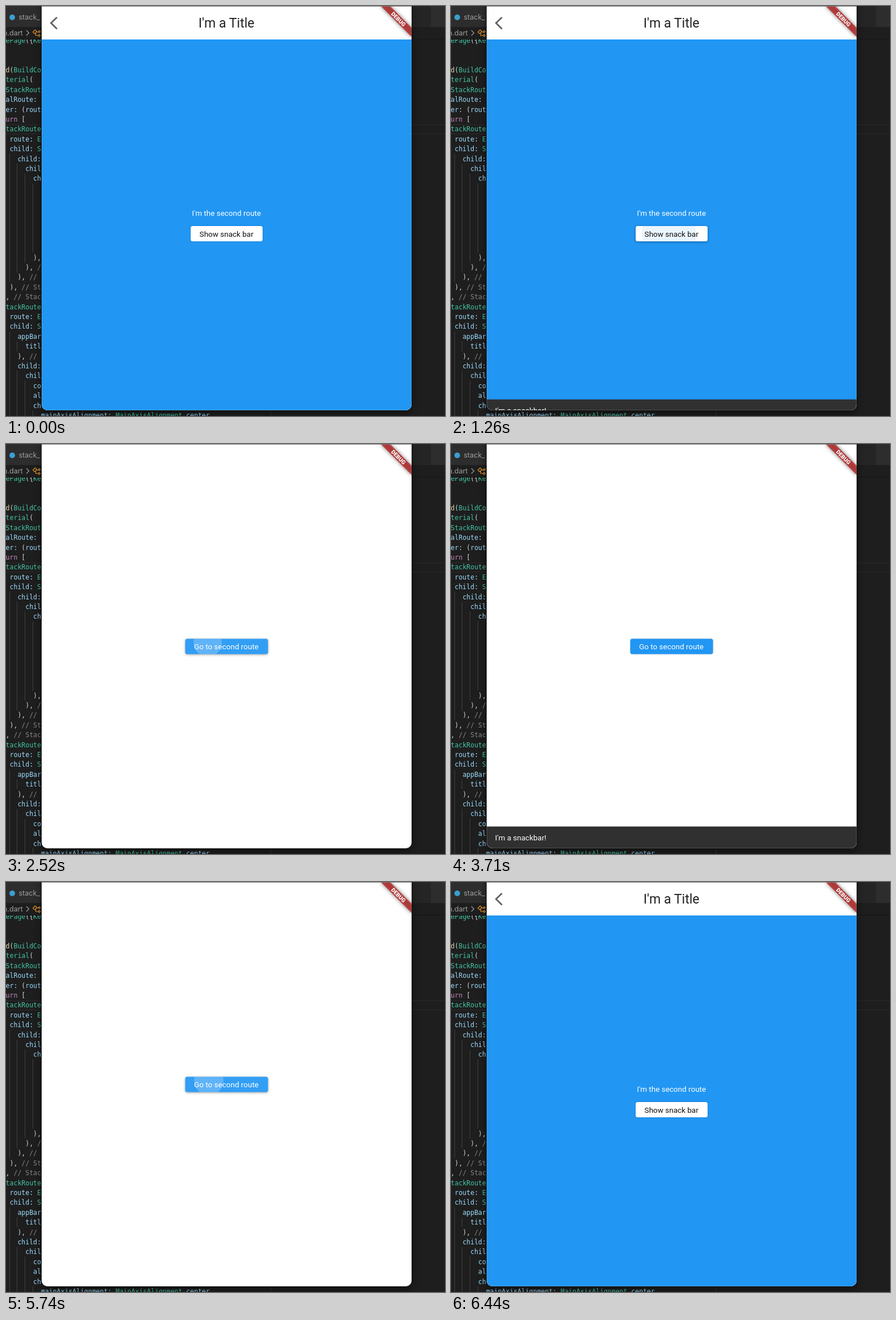
An HTML page that plays this animation: 775x723 px, repeating every 6.93 s.

```html
<!DOCTYPE html>
<html lang="en">
<head>
<meta charset="utf-8">
<title>Stacked routes with a snack bar</title>
<style>
  html, body { margin: 0; width: 100%; height: 100%; overflow: hidden; background: #1e1e1e; }
  svg { display: block; width: 775px; height: 723px; }
  text { font-family: Roboto, sans-serif; font-size: 13.5px; }
  .mid { text-anchor: middle; }
  #code text { font-family: "DejaVu Sans Mono", monospace; font-size: 11.5px; white-space: pre; }
  .ui text { font-family: Inter, sans-serif; font-size: 12.5px; fill: #a0a0a0; }
</style>
</head>
<body>
<svg viewBox="0 0 775 723" xmlns="http://www.w3.org/2000/svg">
  <defs>
    <clipPath id="winClip"><path d="M63 0H716V703a10 10 0 0 1 -10 10H73a10 10 0 0 1 -10 -10Z"/></clipPath>
    <clipPath id="goClip"><rect x="316.5" y="343.5" width="146" height="27" rx="3.5"/></clipPath>
    <clipPath id="showClip"><rect x="326" y="388" width="127" height="27" rx="3.5"/></clipPath>
    <filter id="winBlur" x="-10%" y="-10%" width="120%" height="120%"><feGaussianBlur stdDeviation="7"/></filter>
    <filter id="bannerBlur" x="-30%" y="-150%" width="160%" height="400%"><feGaussianBlur stdDeviation="3.8"/></filter>
  </defs>

  <!-- editor -->
  <rect width="775" height="723" fill="#1e1e1e"/>
  <path d="M0 209.5H775M0 225.5H775" stroke="#2a2a2a"/>
  <path d="M467.5 714V723" stroke="#333"/>
  <g id="guides" stroke="#404040"></g>
  <g id="code"></g>
  <g class="ui">
    <rect width="775" height="37" fill="#2d2d2d"/>
    <rect x="716" width="34" height="37" fill="#252526"/>
    <rect y="37" width="775" height="21" fill="#1e1e1e"/>
    <path d="M0 58.5H775" stroke="#151515"/>
    <circle cx="11" cy="20" r="5" fill="#3a9fd0"/>
    <text x="22.5" y="24">stack_</text>
    <text x="-5" y="52">n.dart</text>
    <path d="M36 43l4.5 4.5L36 52" fill="none" stroke="#a0a0a0" stroke-width="1.2"/>
    <path d="M47.5 46l4-4 3 3-4 4ZM54 46h3M52.5 48v4h4M57 45l2-1.5 1.5 2-2 1.5ZM56.5 52l2-2 2 2-2 2Z"
      fill="none" stroke="#e0932f" stroke-width="1.2"/>
  </g>
  <rect x="63" y="-20" width="653" height="738" rx="10" fill="#000" opacity=".5" filter="url(#winBlur)"/>

  <!-- app window -->
  <g clip-path="url(#winClip)">
    <rect x="63" width="653" height="713" fill="#fff"/>

    <g id="first">
      <rect id="goBtn" x="316.5" y="343.5" width="146" height="27" rx="3.5" fill="#2196f3"/>
      <g clip-path="url(#goClip)">
        <rect id="goHover" x="316" y="343" width="147" height="28" fill="#fff"/>
        <circle id="goRipple" cy="350" fill="#fff"/>
      </g>
      <text class="mid" x="389" y="362" fill="#fff">Go to second route</text>
    </g>

    <g id="second">
      <rect x="63" y="59" width="653" height="654" fill="#2196f3"/>
      <path d="M90 20L79.5 30 90 40.5" fill="none" stroke="#616161" stroke-width="2.8"/>
      <text class="mid" x="389.2" y="37.5" fill="#212121" style="font-size:23.1px">I'm a Title</text>
      <text class="mid" x="389.2" y="370" fill="#fff">I'm the second route</text>
      <rect id="showBtn" x="326" y="388" width="127" height="27" rx="3.5" fill="#fff"/>
      <g clip-path="url(#showClip)"><circle id="showRipple" cx="385" cy="402" fill="#2196f3"/></g>
      <text class="mid" x="389.2" y="406.5" fill="#111">Show snack bar</text>
    </g>

    <g id="snack">
      <rect x="63" y="674.5" width="653" height="40" fill="#303030"/>
      <text x="77.8" y="699" fill="#fff">I'm a snackbar!</text>
    </g>

    <g transform="translate(716 0) rotate(45)">
      <rect x="-38.6" y="27" width="77.2" height="11.6" opacity=".5" filter="url(#bannerBlur)"/>
      <rect x="-38.6" y="27" width="77.2" height="11.6" fill="#b71c1c" opacity=".75"/>
      <text class="mid" y="36.3" fill="#fff" style="font-size:9.8px;font-weight:900">DEBUG</text>
    </g>
    <path d="M63 .5H716" stroke="#777"/>
    <path d="M63.5 0V703a9.5 9.5 0 0 0 9.5 9.5H706a9.5 9.5 0 0 0 9.5 -9.5V0"
      fill="none" stroke="#fff" stroke-opacity=".15"/>
  </g>
</svg>

<script>
const LOOP = 6930, STEP = 70, SNACK = 38.5;
const NS = 'http://www.w3.org/2000/svg';
const $ = id => document.getElementById(id);

function add(parent, tag, attrs, content = '') {
  const el = document.createElementNS(NS, tag);
  for (const key in attrs) el.setAttribute(key, attrs[key]);
  el.textContent = content;
  parent.append(el);
  return el;
}

// Editor text: row, column, then tokens led by a colour key.
const INK = { t: '#43c5a5', b: '#9cdcfe', w: '#d4d4d4', p: '#c586c0', c: '#858585', y: '#dcdcaa' };
const CH = 6.925, LINE = 17.4;
const rowY = row => 113 + row * LINE;
const CODE = `-3 0 tePage|w({|tKe
0 0 yd|w(|tBuildCo
1 0 tterial|w(
2 0 tStackRout
3 0 balRoute:
4 0 ber:|w (|brout
5 0 purn|w [
6 0 ttackRoute
7 1 broute:|t E
8 1 bchild:|t S
9 3 bchild:
10 5 bchil
11 7 bch
19 7 w),
20 5 w),|c /
21 3 w),|c //
22 1 w),|c // St
23 0 w,|c // Stac
24 0 ttackRoute
25 1 broute:|t E
26 1 bchild:|t S
27 3 bappBar
28 5 btitl
29 3 w),|c //
30 3 bchild:
31 5 bchil
32 7 bco
33 7 bal
34 7 bch
35 9 bmainAxisAlignment:|t MainAxisAlignment|w.|bcenter|w,`;

for (const line of CODE.split('\n')) {
  const [, row, col, body] = line.match(/^(\S+) (\S+) (.*)$/);
  const text = add($('code'), 'text', { x: -0.4 + col * CH, y: rowY(+row) + 4 });
  for (const token of body.split('|')) add(text, 'tspan', { fill: INK[token[0]] }, token.slice(1));
}

// Indent guides: column, first row, last row.
for (const [col, from, to] of [[1, 9, 21], [3, 10, 20], [5, 11, 19], [7, 12, 18],
  [1, 27, 35], [3, 28, 28], [3, 31, 35], [5, 32, 35], [7, 35, 35]]) {
  const x = Math.round(col * CH - 0.4) - 0.5;
  add($('guides'), 'path', { d: `M${x} ${rowY(from) - LINE / 2}V${rowY(to) + LINE / 2}` });
}

const ramp = (t, a, b) => Math.min(1, Math.max(0, (t - a) / (b - a)));
const ease = u => u * u * (3 - 2 * u);

function lift(el, amount) {
  const mix = (a, b) => a + (b - a) * amount;
  el.style.filter = `drop-shadow(0 ${mix(.6, 1)}px ${mix(1, 2)}px rgba(0,0,0,${mix(.22, .36)}))`;
}

function ripple(el, radius, alpha) {
  el.setAttribute('r', radius);
  el.setAttribute('opacity', alpha);
}

function snackLevel(t) {
  if (t < 2520) return ease(ramp(t, 1120, 1400));
  if (t < 4410) return ease(ramp(t, 2520, 2660));
  return (1 - ramp(t, 4410, 4690)) ** 2;
}

function draw(t) {
  const onSecond = t < 2520 || t >= 5880;
  $('first').style.display = onSecond ? 'none' : '';
  $('second').style.display = onSecond ? '' : 'none';

  const returning = t < 4000;
  const hover = returning ? 1 - ramp(t, 2520, 2660) : ramp(t, 5530, 5740);
  lift($('goBtn'), hover);
  $('goHover').setAttribute('opacity', 0.08 * hover);
  $('goRipple').setAttribute('cx', returning ? 356 : 358);
  if (returning) ripple($('goRipple'), 25 + ramp(t, 2520, 2660) * 10, 0.22 * hover);
  else ripple($('goRipple'), 26 * ramp(t, 5600, 5740) + 5 * ramp(t, 5740, 5810), 0.22 * ramp(t, 5600, 5740));

  lift($('showBtn'), ramp(t, 140, 420) - ramp(t, 1680, 1890));
  ripple($('showRipple'), 12 + 60 * ramp(t, 1050, 1400), 0.14 * ramp(t, 1050, 1120) * (1 - ramp(t, 1190, 1400)));

  const level = snackLevel(t);
  $('snack').style.display = level > 0 ? '' : 'none';
  $('snack').setAttribute('transform', `translate(0 ${SNACK * (1 - level)})`);
}

const start = performance.now();
function tick() {
  const t = (performance.now() - start) % LOOP;
  draw(Math.floor(t / STEP) * STEP);
  requestAnimationFrame(tick);
}
draw(0);
requestAnimationFrame(tick);
</script>
</body>
</html>
```
